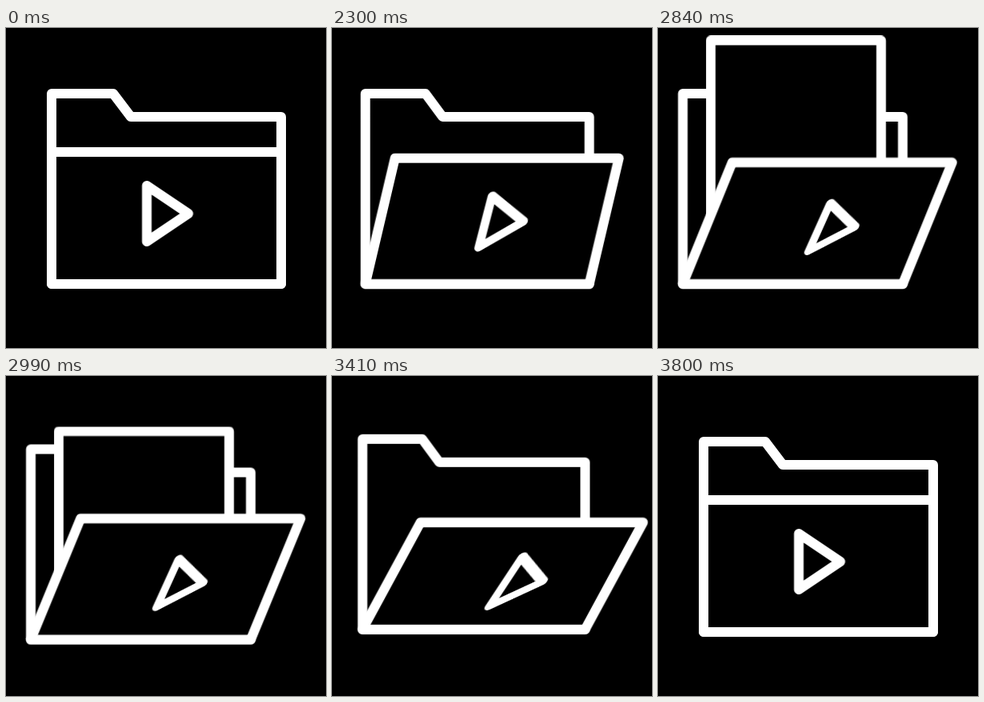
Animation of 400 by 400 pixels, one loop 3.83 s. Source, as an HTML page:

```html
<!DOCTYPE html>
<html lang="en">
<head>
<meta charset="utf-8">
<title>Video folder</title>
<style>
  html, body { margin: 0; width: 100%; height: 100%; overflow: hidden; background: #000; }
  svg { display: block; width: 100vw; height: 100vh; }
  path { fill: #000; stroke: #fff; stroke-width: 12; stroke-linejoin: round; }

  /* The folder keeps its line weight; the play sign is squeezed whole. */
  .back, .paper, .front { vector-effect: non-scaling-stroke; }

  .slide, .bounce, .paper, .front, .play {
    transform-origin: 0 0;
    animation: 3830ms cubic-bezier(.37, 0, .63, 1) infinite;
  }
  .slide { animation-name: slide; }
  .bounce { animation-name: bounce; }
  .paper { animation-name: paper; }
  .front { animation-name: front; }
  .play { animation-name: play; }

  @keyframes slide {
    0%, 52.22%, 99.22%, 100% { transform: translateX(0) scaleX(1); }
    66.32%, 83.55% { transform: translateX(-26px) scaleX(.958); }
  }

  /* The folder sinks as the sheet lands, then springs back. */
  @keyframes bounce {
    0%, 75.72% { transform: translateY(0); }
    81.2%, 81.98% { transform: translateY(24px); }
    90.2% { transform: translateY(-4.5px); }
    98.43%, 100% { transform: translateY(0); }
  }

  @keyframes paper {
    0%, 66.32% { transform: translateY(306px); }
    75.3% { transform: translateY(0); animation-timing-function: cubic-bezier(.5, 0, .9, .6); }
    81.2%, 100% { transform: translateY(306px); }
  }

  @keyframes front {
    0%, 52.22%, 97.13%, 100% { transform: skewX(0deg) scaleY(1); }
    66.32%, 77.28% { transform: skewX(-23deg) scaleY(.921); }
    83.55% { transform: skewX(-29.2deg) scaleY(.83); }
    89.82% { transform: skewX(-29.2deg) scaleY(.81); }
  }

  @keyframes play {
    0%, 52.22%, 97.13%, 100% { transform: translate(136.3px, -88px) skewX(0deg) scale(1, 1); }
    66.32%, 77.28% { transform: translate(193.7px, -71.2px) skewX(-25.1deg) scale(.89, .857); }
    83.55% { transform: translate(202.2px, -61.9px) skewX(-32.8deg) scale(.89, .841); }
    89.82% { transform: translate(200.7px, -60px) skewX(-34.3deg) scale(.92, .886); }
  }
</style>
</head>
<body>
<svg viewBox="0 0 400 400">
  <clipPath id="pocket"><rect x="0" y="-400" width="300" height="380"/></clipPath>
  <!-- Origin: bottom left corner of the folder -->
  <g transform="translate(57 320)">
    <g class="slide">
      <g class="bounce">
        <path class="back" d="M0 0V-238H77L99-209H287V0Z"/>
        <g clip-path="url(#pocket)">
          <path class="paper" d="M36.4 0V-316H258.8V0"/>
        </g>
        <path class="front" d="M0 0V-165H287V0Z"/>
        <path class="play" d="M-17.3-35L34.7 0L-17.3 35Z"/>
      </g>
    </g>
  </g>
</svg>
</body>
</html>
```
